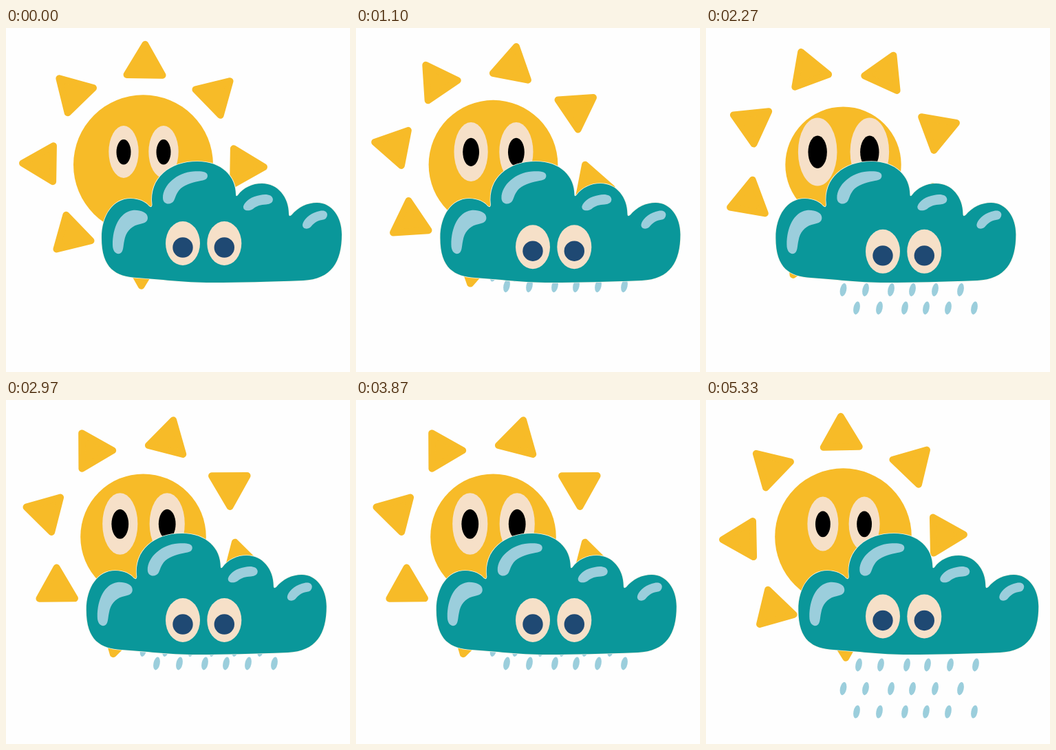
Write an HTML page with a canvas that moves like this. It is 500 px wide and 500 px high and loops after 5.36 s.

```html
<!DOCTYPE html>
<html lang="en">
<head>
<meta charset="utf-8">
<title>Sun and rain cloud</title>
<style>
  html, body { margin: 0; width: 100%; height: 100%; overflow: hidden; background: #fefefe; }
  canvas { display: block; width: 100vmin; height: 100vmin; }
</style>
</head>
<body>
<canvas id="stage" width="500" height="500"></canvas>
<script>
const ctx = document.getElementById('stage').getContext('2d');

const LOOP = 5360;        // ms
const STEP = 100 / 3;     // ms per drawn step
const CYCLE = 27;         // steps in one sway of the cloud

const YELLOW = '#f7bb28', CREAM = '#f6e0c8', TEAL = '#0a979a';
const PALE = '#9bcedc', NAVY = '#1f4973';

// Motion keys: [step in cycle, value]
const SWAY = [[0, 0], [1, 2.5], [8, 22.2], [13.8, 38.2], [20, 19.8], [25, 4.7], [27, 0]];
const SPIN = [[0, 0.9], [1, 2.4], [8, 14.4], [20, 34.7], [25, 43.8], [27, 45.9]];
const RAIN = [
  { xs: [222, 254, 292, 322, 355, 392], y: [[0, 345], [12, 348], [20, 368.5], [25, 385], [27, 392]] },
  { xs: [199.5, 232, 269, 300, 333, 370], y: [[0, 346], [8, 363.5], [20, 397.5], [25, 419.5], [27, 428]] },
  { xs: [219, 252, 289, 320, 352, 390], y: [[0, 350], [8, 383], [20, 431], [27, 462]] }
];

const cloud = new Path2D(
  'M139 305 C139 272 156 248 181 248 C194 248 203 253 208 259 Q212 262 212.5 257 ' +
  'C208 218 238 194 278 194 C314 194 334 216 334 242 Q334 246 337 243 ' +
  'C345 232 358 226 372 226 C395 226 411 246 411 270 Q411 275 415 272 ' +
  'C425 260 438 254 452 254 C474 254 488 275 488 300 C488 340 473 365 432 367 ' +
  'C380 369 340 370 300 370 C255 370 225 365 190 363 C160 361 139 350 139 305 Z');

const shine = new Path2D(
  'M206 276 C206 267 193 264 184 265 C165 268 155 290 155 315 C155 325 160 329 165 328 ' +
  'C171 326 170 318 172 309 C174 297 181 289 191 286 C199 284 206 283 206 276 Z ' +
  'M293 215 C293 208 283 208 272 208.5 C249 210 228 228 228 247 C228 257 240 258 244 251 ' +
  'C247 245 248 237 257 231 C266 225 279 223 286 221.5 Q293 220 293 215 Z ' +
  'M388 249 C387 242 378 241 369 243 C357 245 348 251 345 259 C344 266 353 267 359 263 ' +
  'C365 258 370 257 378 256.5 Q388 256 388 249 Z ' +
  'M467 271 C466 264 458 265 452 267 C441 270 432 279 431 286 C431 293 439 293 443 289 ' +
  'C447 284 452 280 459 279 Q467 278 467 271 Z');

function track(keys, p) {
  let i = 1;
  while (i < keys.length - 1 && p > keys[i][0]) i++;
  const [x0, y0] = keys[i - 1], [x1, y1] = keys[i];
  return y0 + (y1 - y0) * (p - x0) / (x1 - x0);
}

function oval(x, y, rx, ry, color, tilt = 0) {
  ctx.fillStyle = color;
  ctx.beginPath();
  ctx.ellipse(x, y, rx, ry, tilt, 0, Math.PI * 2);
  ctx.fill();
}

function drawRays(deg) {
  ctx.fillStyle = ctx.strokeStyle = YELLOW;
  ctx.lineWidth = 10;
  ctx.lineJoin = 'round';
  for (let i = 0; i < 8; i++) {
    ctx.save();
    ctx.translate(199.5, 199.3);
    ctx.rotate((deg + i * 45) * Math.PI / 180);
    ctx.beginPath();
    ctx.moveTo(0, -175.5);
    ctx.lineTo(26, -131);
    ctx.lineTo(-26, -131);
    ctx.closePath();
    ctx.fill();
    ctx.stroke();
    ctx.restore();
  }
}

function drawSun(sway) {
  const r = 101.5 - sway * 0.46;
  oval(199.5, 198.7, r, r, YELLOW);
  const k = 1 + sway * 0.0081;
  for (const side of [-1, 1]) {
    const x = 200 + side * 29 * k;
    oval(x, 180, 21.7 * k, 38 * k, CREAM);
    oval(x, 180.3, 10.5 * k, 18.2 * k, '#000');
  }
}

function drawRain(p) {
  for (const row of RAIN) {
    const y = track(row.y, p);
    for (const x of row.xs) oval(x, y, 4.6, 9.6, PALE, 0.2);
  }
}

function drawCloud(sway) {
  ctx.save();
  ctx.translate(-sway, 0);
  ctx.strokeStyle = '#f8f4e4';
  ctx.lineWidth = 1.6;
  ctx.stroke(cloud);
  ctx.fillStyle = TEAL;
  ctx.fill(cloud);
  ctx.fillStyle = PALE;
  ctx.fill(shine);
  ctx.restore();

  const drop = sway * 0.315;
  for (const x of [257, 317.3]) {
    oval(x, 313 + drop, 25, 32, CREAM);
    oval(x, 319 + drop, 14.7, 14.7, NAVY);
  }
}

function draw(ms) {
  const p = Math.floor((ms % LOOP + 5) / STEP) % CYCLE;
  const sway = track(SWAY, p);
  ctx.fillStyle = '#fefefe';
  ctx.fillRect(0, 0, 500, 500);
  drawRays(track(SPIN, p));
  drawSun(sway);
  drawRain(p);
  drawCloud(sway);
}

let start = null;
function tick(now) {
  if (start === null) start = now;
  draw(now - start);
  requestAnimationFrame(tick);
}
draw(0);
requestAnimationFrame(tick);
</script>
</body>
</html>
```
